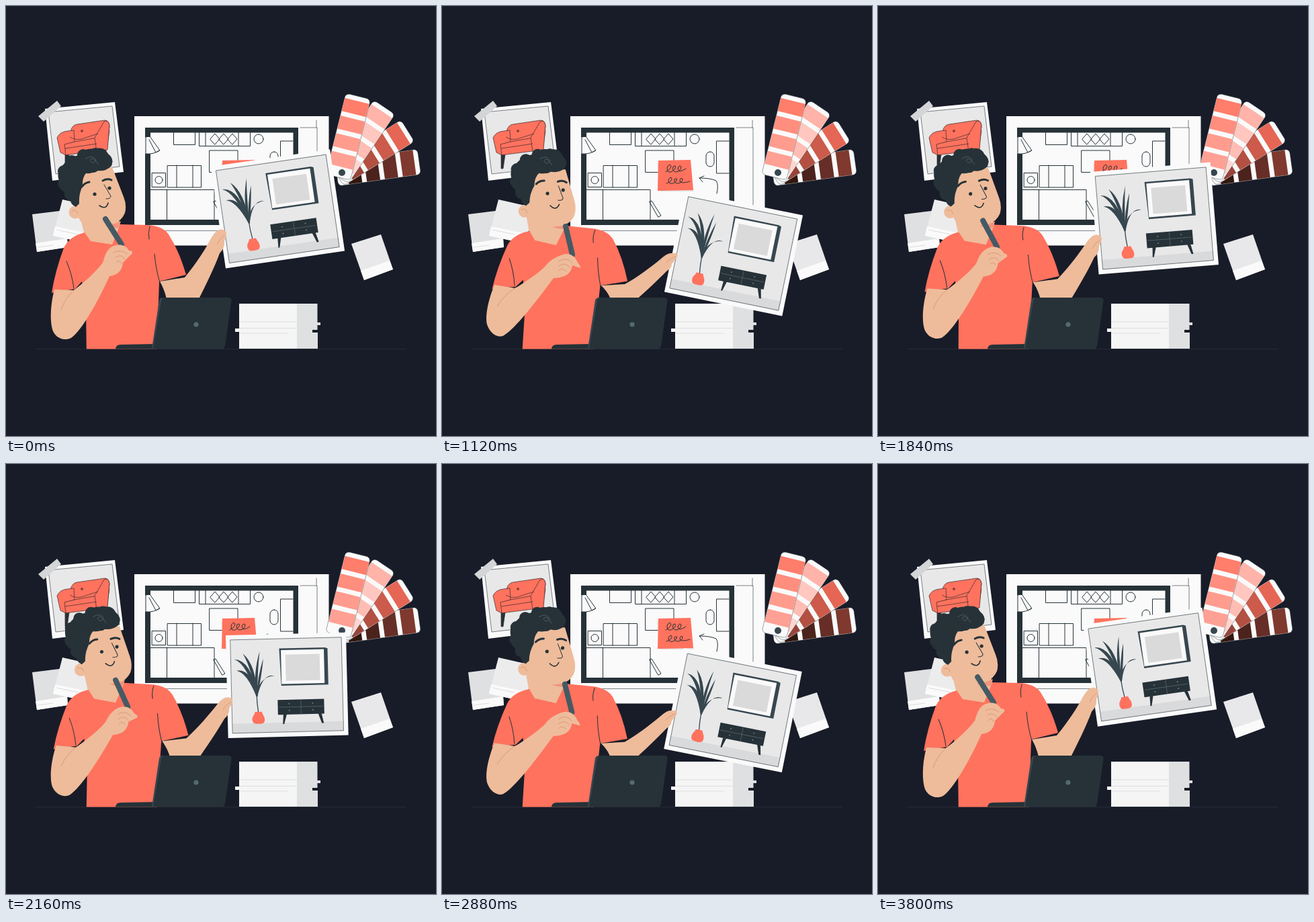
An HTML page for the animation above (3.88 s loop, 640x640 px).

```html
<!DOCTYPE html>
<html lang="en">
<head>
<meta charset="utf-8">
<title>Interior designer</title>
<style>
  html, body { margin: 0; width: 100%; height: 100%; overflow: hidden; background: #181c28; }
  svg { display: block; width: 100vw; height: 100vh; }
  .ln { fill: none; stroke: #263238; stroke-linecap: round; stroke-linejoin: round; }
  .dk { fill: #263238; }
  .co { fill: #ff725e; }
  .sk { fill: #eebc9b; }
  .wh { fill: #fafafa; }
  .fold { fill: none; stroke: #d99a78; stroke-linecap: round; }
</style>
</head>
<body>
<svg viewBox="0 0 640 640">
  <clipPath id="desk"><path d="M0 0H640V510.500H0Z"/></clipPath>
  <path d="M44 510.500H596" stroke="#242b36"/>

  <!-- pinned notes -->
  <path fill="#dfe0e2" d="M39 310L88 304L92 359L46 366Z"/>
  <path class="wh" d="M44 353L91 346L92 359L46 366Z"/>
  <path fill="#ececed" d="M84 288L128 298L131 332L116 352L70 342Z"/>
  <path class="wh" d="M73 328L121 338L116 352L70 342Z"/>
  <path d="M75 333L108 340M47 359L70 356" stroke="#dcdcde"/>
  <path fill="#e8e8ea" d="M514 354L558 340L576 392L533 408Z"/>
  <path class="wh" d="M528 394L571 379L576 392L533 408Z"/>

  <!-- armchair picture -->
  <path class="wh" d="M58 153L162 143L175 247L69 260Z"/>
  <path fill="#e8e8e9" stroke="#263238" stroke-width=".6" d="M63 158L158 149L169 239L74 250Z"/>
  <g stroke="#3a2a2c" stroke-width=".7" stroke-linejoin="round">
    <path class="dk" d="M88 221L94 221L91 242L88 242ZM143 213L148 212L152 233L149 233Z"/>
    <path class="co" d="M96 187Q98 177 106 176L147 170Q154 170 154 180L149 205L100 204Z"/>
    <path class="co" d="M85 205L136 196L152 182Q155 184 153 192L150 214L88 222Z"/>
    <path class="co" d="M76 196Q80 187 92 186L101 185L102 202L87 206L89 222L81 218Z"/>
    <path class="co" d="M132 196L146 172Q152 169 154 177L151 214L135 217Z"/>
    <path fill="none" d="M95 195Q103 200 112 198L137 190M88 212L135 205"/>
    <circle cx="113" cy="186" r="1.4" fill="#b7483c"/>
  </g>
  <path fill="#d3d5d7" d="M48 164L76 141L82 149L56 172Z"/>

  <!-- floor plan -->
  <path class="wh" d="M191 164H480.500V356.500H191Z"/>
  <path class="dk" fill-rule="evenodd" d="M207 181H435V326H207ZM215 188.500V318H427.500V188.500Z"/>
  <path class="wh" d="M206 195H216V220H206Z"/>
  <g class="ln">
    <path stroke-width=".6" d="M438 181H463V356M462 170V181M209 334.500H440"/>
    <path d="M208 195L214 194L229 215L223 218L213 199M208 195V220Q220 221 228 215"/>
    <path d="M249.500 188V206.500H281.500V188M287.500 188V208.500H363.500V188M303 215H345V247.500H303ZM427 201H408.500V249H427"/>
    <path d="M304 198l7-8 7 8-7 8zM317 198l7-8 7 8-7 8zM330 198l7-8 7 8-7 8zM297 188V208M346 188V208"/>
    <circle cx="376" cy="198" r="7"/>
    <rect x="393" y="217" width="12" height="22" rx="6"/>
    <path d="M217.500 248.500H237.500V269.500H217.500ZM240.500 237.500H290.500V270H240.500ZM254 237V270M278 237V270"/>
    <circle cx="227.500" cy="259" r="5.500"/>
    <path d="M215 273.500H310V292M239.500 273V318M309 291L312 290L326 312L322 314ZM310 292V318"/>
    <path d="M409 279Q412 266 408 260Q399 256 383 256M390 253L383 256L388 262"/>
  </g>
  <path fill="#e2e2e4" d="M320 233L325 276L376 276L370 272Z"/>
  <path class="co" d="M322 230L370 229L374 274L321 275Z"/>
  <path class="ln" d="M333 247Q345 240 339 236Q333 239 336 246Q340 250 347 242Q349 236 344 239Q342 246 348 247Q355 247 356 239Q352 236 351 243Q353 249 363 242"/>
  <path class="ln" d="M334 264Q345 260 341 255Q335 257 338 263Q343 267 349 260Q351 255 346 258Q345 264 351 264Q358 263 358 257Q354 255 354 261Q357 265 369 261"/>

  <g id="fan"></g>

  <!-- paper stack -->
  <path fill="#f5f5f5" d="M347 443H433V510H347ZM341 480H348V485H341Z"/>
  <path fill="#dfe0e2" d="M433 443H463.500V471H468V475H463.500V482H456V486H464V510H433Z"/>
  <path d="M347 470H433M347 479.500H433M347 487H420" stroke="#dedee0"/>

  <!-- held print -->
  <g id="print">
    <path class="wh" d="M0 0H179V153H0Z"/>
    <path fill="#e8e8e9" d="M7 7H172V146H7Z"/>
    <path fill="#d9dadb" d="M7 132H172V146H7Z"/>
    <path class="ln" stroke-width=".6" d="M7 7H172V146H7Z"/>
    <path fill="#37474f" d="M79 21.500H147L151 23V77H81Z"/>
    <path class="wh" d="M81.500 24H145.500V74.500H81.500Z"/>
    <path fill="#dadada" d="M88 31H139V70H88Z"/>
    <path class="dk" d="M75 98H144V120H75ZM83 120H88L84 134H82ZM135 120H140L143 134H140Z"/>
    <path d="M77 109H142M109.500 99V119" stroke="#4c5c64"/>
    <g fill="#6f7e86">
      <circle cx="92" cy="104" r="1"/><circle cx="127" cy="104" r="1"/>
      <circle cx="92" cy="114" r="1"/><circle cx="127" cy="114" r="1"/>
    </g>
    <g id="leaves" fill="#37474f"></g>
    <path d="M44 88Q44 102 46 117" fill="none" stroke="#37474f" stroke-width="1.300"/>
    <path class="co" d="M41 115H51L52 118Q57 126 54 131Q52 133 46 133Q39 133 38 131Q34 125 40 118Z"/>
  </g>

  <path id="armR" class="sk"/>
  <path id="thumb" class="fold"/>

  <g clip-path="url(#desk)">
    <g id="torso">
      <path class="sk" d="M108 305L118 345L128 353L158 358L171 330L165 305Z"/>
      <path fill="#f0957c" d="M140 321Q155 329 171 320L168 330Q150 332 140 321Z"/>
      <path class="co" d="M117 337Q94 343 86 360Q73 395 68 427L103 421L113 410L119 450L120 530H224L228 410L268 400Q258 365 242 340Q234 328 213 326L170 325L158 355L126 350Z"/>
      <path class="ln" d="M90 380Q98 398 101 420M214 328Q211 338 213 347M221 369Q223 392 229 412"/>
    </g>
  </g>

  <g id="head">
    <path class="sk" d="M104 255L104 300Q108 324 122 331Q145 327 160 324Q172 320 177 308Q180 296 175 284L158 240L115 245Z"/>
    <circle class="sk" cx="103" cy="307" r="9.500"/>
    <path class="fold" d="M98 305Q104 302 107 309"/>
    <g class="dk">
      <path d="M82 240Q94 224 108 222Q118 210 132 213Q146 208 152 220Q161 227 157 238Q148 247 136 245Q127 250 119 249Q113 256 114 268Q108 280 109 294L104 299Q97 296 96 290Q86 288 87 277Q77 272 80 262Q74 250 82 240Z"/>
      <circle cx="86" cy="246" r="9"/><circle cx="98" cy="231" r="9"/>
      <circle cx="115" cy="222" r="9"/><circle cx="133" cy="220" r="9"/>
      <circle cx="149" cy="231" r="9.500"/><circle cx="130" cy="239" r="9"/>
      <circle cx="86" cy="264" r="9"/><circle cx="95" cy="280" r="8.500"/>
    </g>
    <path d="M118 228Q128 220 134 229Q130 237 125 230Q128 222 138 236" fill="none" stroke="#53646c" stroke-width=".8"/>
    <g id="face">
      <circle class="dk" cx="132" cy="280" r="2.600"/><circle class="dk" cx="154" cy="271" r="2.600"/>
      <path class="ln" d="M146 266L156 283Q156 287 149 287"/>
      <path class="ln" stroke-width="3" d="M113 269Q117 263 124 262M144 260Q151 256 157 259"/>
      <path class="ln" stroke-width="1.600" d="M139 297Q149 304 152 293"/>
    </g>
  </g>

  <path id="pen" stroke="#455a64" stroke-width="8" stroke-linecap="round"/>
  <path id="armL" class="sk"/>
  <path id="folds" class="fold"/>

  <!-- laptop -->
  <path class="dk" d="M163 510Q164 504 170 504L222 503V510.500H163Z"/>
  <path fill="#37474f" d="M234 434H240L222 510.500H217L228 438Q229 434 234 434Z"/>
  <path class="dk" d="M236 434H331Q336 434 335.500 439L326 506Q325 510.500 320 510.500H219L231 439Q232 434 236 434Z"/>
  <circle cx="283" cy="474" r="3.600" fill="#566870"/>
</svg>
<script>
const $ = id => document.getElementById(id);

// colour fan, back card first
const fan = [
  [82, 0, '#7f392f #662e26 #4c221c #33170f'],
  [58, -1, '#e66655 #cc5b4b #b35042 #99443a'],
  [34, -2, '#ffb3a9 #ffc7bf #ffbdb4 #ffd5cf'],
  [14, -4, '#ff7d6b #ff8e7e #ff9c8e #ffa094']
];
$('fan').innerHTML = fan.map(([a, x, cols]) =>
  `<g transform="translate(500 248) rotate(${a}) translate(${x} 0)">
    <rect class="wh" x="-19" y="-116" width="38" height="124" rx="6" stroke="#263238" stroke-width=".4"/>` +
  cols.split(' ').map((c, i) =>
    `<rect x="-18.500" y="${-109 + i * 27}" width="37" height="20" fill="${c}"/>`).join('') + '</g>'
).join('') + '<circle cx="500" cy="248" r="5" fill="#37474f"/>';

// leaves: tip, then bend point
const leaves = [
  [12, 36, 33, 39], [25, 28, 40, 46], [50, 25, 42, 54], [55, 36, 49, 58],
  [71, 62, 50, 59], [15, 53, 33, 52]
];
$('leaves').innerHTML = leaves.map(([x, y, bx, by]) =>
  `<path d="M43.500 92Q${bx - 3} ${by + 4} ${x} ${y}Q${bx + 4} ${by - 2} 45 92Z"/>`).join('');

// shapes that bend between the two end poses
const morphs = {
  armR: [
    'M229 410C236 422 238 432 240 440L285 440C297 416 310 390 318 368Q326 360 325 350L328 341Q328 333 322 333C317 331 311 336 305 346C298 360 284 382 266 404Z',
    'M237 416C246 425 250 432 252 440L286 440C302 426 320 409 335 394Q342 390 342 384L349 375Q353 367 346 368C338 367 333 370 325 377C310 389 291 404 272 414Z'
  ],
  thumb: ['M325 341Q318 346 315 354', 'M348 373Q340 375 334 382'],
  armL: [
    'M72 422C66 445 65 470 70 484C76 497 90 498 97 494C112 484 137 440 154 402C170 400 173 390 174 382L188 368Q189 364 183 364C178 355 168 354 160 357C150 361 147 372 144 382C132 398 115 412 101 423Z',
    'M78 415C68 440 64 462 67 474C72 489 84 494 91 491C110 480 142 437 166 405C185 404 192 398 194 386L206 390Q207 388 202 382C198 371 188 367 180 370C168 374 160 379 154 387C143 398 125 410 109 420Z'
  ],
  folds: [
    'M82 452Q88 434 102 422M160 367Q170 361 180 369M163 374Q172 368 177 377M164 382Q168 376 172 383',
    'M82 447Q92 430 110 419M174 380Q186 372 194 383M174 387Q184 380 190 389M174 394Q180 388 185 395'
  ],
  pen: ['M148 317L172 355', 'M184 328L194 370']
};
const mix = ([a, b], s) => {
  const end = b.match(/[\d.]+/g);
  let i = 0;
  return a.replace(/[\d.]+/g, n => (+n + (end[i++] - n) * s).toFixed(2));
};

// smooth curve through the keyed values
const keys = [0, 480, 960, 1120, 1520, 1680, 1920];
const tracks = {
  lean: [0, .48, .97, 1, .57, .42, .13],
  x: [404.500, 420.500, 433, 434, 423, 418.300, 408],
  y: [301.800, 333.500, 366.500, 368.500, 339, 329.300, 309],
  turn: [-8.300, 1.800, 11.300, 11.600, 2.200, -1.400, -6.300]
};
function at(v, t) {
  const last = keys.length - 1;
  let i = 0;
  while (i < last - 1 && t > keys[i + 1]) i++;
  const slope = k => {
    if (k === 0) return 0;
    const n = Math.min(k + 1, last);
    return (v[n] - v[k - 1]) / (keys[n] - keys[k - 1]);
  };
  const h = keys[i + 1] - keys[i], p = (t - keys[i]) / h, q = 1 - p;
  return q * q * (1 + 2 * p) * v[i] + p * p * (1 + 2 * q) * v[i + 1] +
    h * p * q * (q * slope(i) - p * slope(i + 1));
}

const LOOP = 3880, STEP = 40, HALF = 1920;
function draw(ms) {
  // the move runs forward, then back, and rests on its last step
  const t = Math.min(Math.floor(ms % LOOP / STEP) * STEP, 2 * HALF - STEP);
  const u = t <= HALF ? t : 2 * HALF - t;
  const s = at(tracks.lean, u);
  for (const id in morphs) $(id).setAttribute('d', mix(morphs[id], s));
  $('torso').setAttribute('transform', `rotate(${4.4 * s} 150 510)`);
  $('head').setAttribute('transform', `translate(${18 * s} ${s}) rotate(${5 * s} 135 330)`);
  $('face').setAttribute('transform', `translate(${2 * s} ${-s}) rotate(${5 * s} 145 285)`);
  $('print').setAttribute('transform',
    `translate(${at(tracks.x, u)} ${at(tracks.y, u)}) rotate(${at(tracks.turn, u)}) translate(-89.5 -76.5)`);
}

const start = performance.now();
function tick() {
  draw(performance.now() - start);
  requestAnimationFrame(tick);
}
tick();
</script>
</body>
</html>
```
